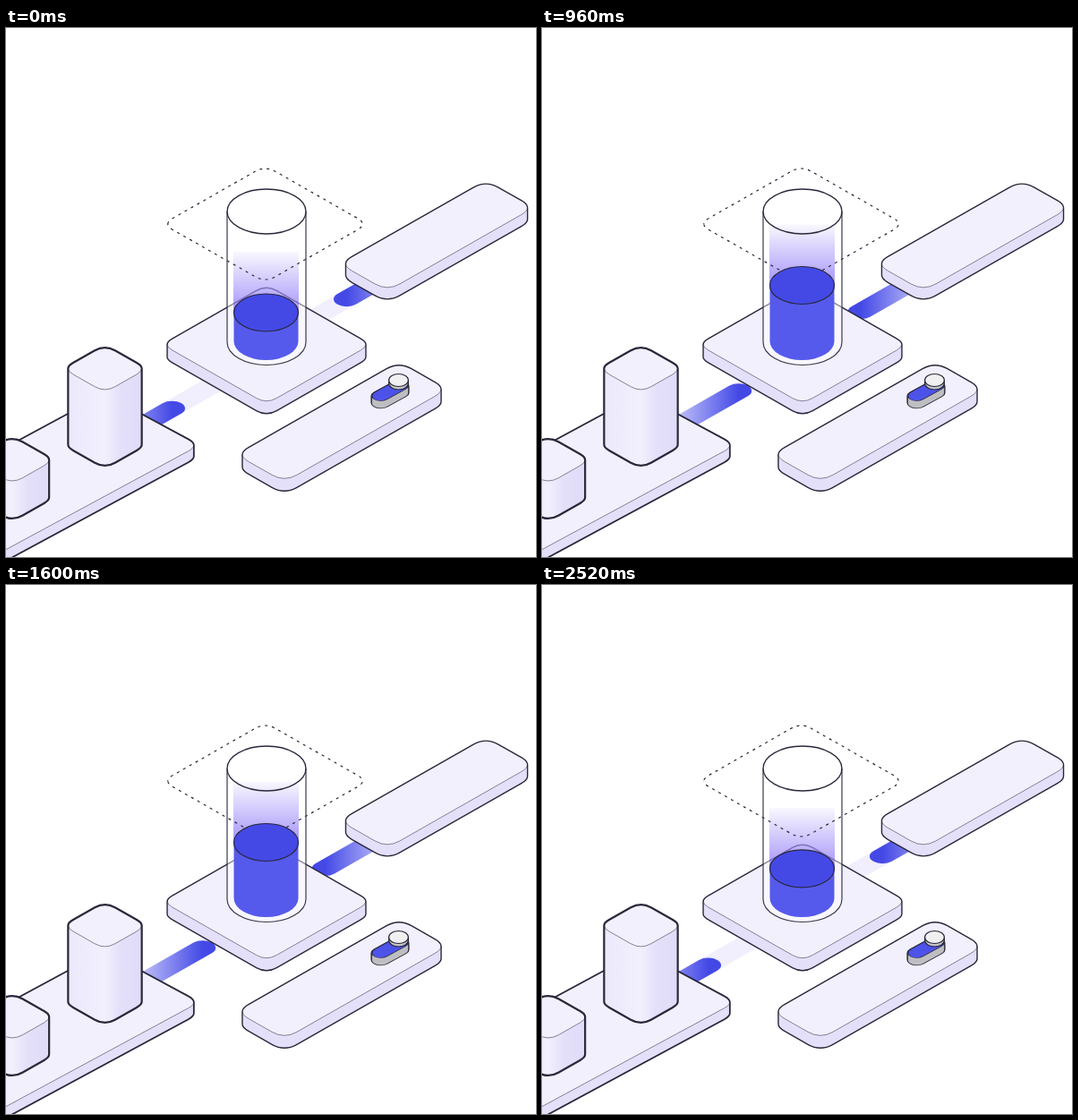
An HTML page with a canvas for the animation above (2.56 s loop, 592x591 px).

```html
<!DOCTYPE html>
<html lang="en">
<head>
<meta charset="utf-8">
<title>Isometric tank</title>
<style>
html, body { margin: 0; width: 100%; height: 100%; overflow: hidden; background: #fff; }
canvas { display: block; }
</style>
</head>
<body>
<canvas id="stage" width="592" height="591"></canvas>
<script>
const ctx = document.getElementById('stage').getContext('2d');
const LOOP = 2560, SLOPE = 0.57;
const INK = '#28283a', FACE = '#f2f0fd', SIDE = '#e4e0fa', BLUE = '#4449e6';

const mix = (p, q, t) => [p[0] + (q[0] - p[0]) * t, p[1] + (q[1] - p[1]) * t];

// Rounded isometric block: a and b are half widths along the two ground axes.
function block(cx, cy, a, b, cut, depth, slope = SLOPE) {
  const at = (s, t) => [cx + s * a + t * b, cy + slope * (t * b - s * a)];
  const L = at(-1, -1), T = at(1, -1), R = at(1, 1), B = at(-1, 1);
  const near = (p, q) => mix(p, q, cut / Math.hypot(q[0] - p[0], q[1] - p[1]));
  const middle = (p, q, r) => mix(mix(q, r, 0.5), p, 0.5);
  const LT = near(L, T), LB = near(L, B), RT = near(R, T), RB = near(R, B);
  const left = middle(L, LT, LB), right = middle(R, RT, RB);
  const line = (path, p, dy = 0) => path.lineTo(p[0], p[1] + dy);
  const curve = (path, c, p, dy = 0) => path.quadraticCurveTo(c[0], c[1] + dy, p[0], p[1] + dy);

  const back = path => {
    path.moveTo(...left);
    curve(path, mix(L, LT, 0.5), LT);
    line(path, near(T, L));
    curve(path, T, near(T, R));
    line(path, RT);
    curve(path, mix(R, RT, 0.5), right);
  };
  const front = (path, dy) => {
    line(path, right, dy);
    curve(path, mix(R, RB, 0.5), RB, dy);
    line(path, near(B, R), dy);
    curve(path, B, near(B, L), dy);
    line(path, LB, dy);
    curve(path, mix(L, LB, 0.5), left, dy);
  };
  const hull = new Path2D(), face = new Path2D(), rim = new Path2D();
  back(hull); front(hull, depth); hull.closePath();
  back(face); front(face, 0); face.closePath();
  rim.moveTo(...right); front(rim, 0);
  return { hull, face, rim, x0: left[0], x1: right[0] };
}

function stroke(path, color, width) {
  ctx.strokeStyle = color;
  ctx.lineWidth = width;
  ctx.stroke(path);
}

function fill(path, color) {
  ctx.fillStyle = color;
  ctx.fill(path);
}

function drawBlock(shape, width, side = SIDE) {
  fill(shape.hull, side);
  fill(shape.face, FACE);
  stroke(shape.rim, '#77758a', 0.9);
  stroke(shape.hull, INK, width);
}

function drawColumn(shape) {
  const shade = ctx.createLinearGradient(shape.x0, 0, shape.x1, 0);
  shade.addColorStop(0, '#ebe8fc');
  shade.addColorStop(0.5, '#f2f0fd');
  shade.addColorStop(0.7, '#e4e0fa');
  shade.addColorStop(1, '#e0dcf8');
  drawBlock(shape, 2.2, shade);
}

function ellipse(x, y, rx, ry) {
  const path = new Path2D();
  path.ellipse(x, y, rx, ry, 0, 0, 7);
  return path;
}

function cylinder(x, top, bottom, rx, ry) {
  const path = new Path2D();
  path.moveTo(x + rx, top);
  path.ellipse(x, bottom, rx, ry, 0, 0, Math.PI);
  path.lineTo(x - rx, top);
  return path;
}

// A round-ended strip lying flat on the ground plane.
function strip(x0, y0, x1, y1, color, width) {
  ctx.save();
  ctx.scale(1, SLOPE);
  ctx.lineCap = 'round';
  const path = new Path2D();
  path.moveTo(x0, y0 / SLOPE);
  path.lineTo(x1, y1 / SLOPE);
  stroke(path, color, width);
  ctx.restore();
}

// A pale track with a blue pill whose colour fades away behind its tip.
function pipe(start, end, tip, y, fade) {
  const yAt = x => y - SLOPE * (x - start);
  const shade = ctx.createLinearGradient(tip, 0, tip - fade, 0);
  shade.addColorStop(0, BLUE);
  shade.addColorStop(1, '#d8d8fb');
  strip(start, y, end, yAt(end), '#f1effd', 29);
  strip(start, y, tip, yAt(tip), shade, 29);
}

const platform = block(291, 353.5, 58.3, 58.3, 13, 14);
const hoverOutline = block(289.5, 219, 57.2, 57.2, 13, 0).face;
const rightBar = block(481, 232, 81.75, 26.75, 16, 13);
const lowerBar = block(375, 440, 91, 27, 16, 14);
const leftSlab = block(13, 518.4, 150, 53, 14, 12.5, 0.54);
const tallColumn = block(110.5, 380.5, 23.4, 23.4, 13, 85);
const shortColumn = block(7, 482.5, 23.4, 23.4, 13, 42);

// Progress through one half of the loop, and the rise of the liquid there.
const RISE = [[0, 0], [0.28, 10], [0.594, 22], [0.75, 30.5], [0.906, 35.5], [1, 37.5]];
function rise(p) {
  const i = Math.max(1, RISE.findIndex(k => k[0] >= p));
  const [p0, v0] = RISE[i - 1], [p1, v1] = RISE[i];
  return v0 + (v1 - v0) * (p - p0) / (p1 - p0);
}

function tank(p) {
  const x = 290.5, level = 318 - rise(p);
  const glass = cylinder(x + 0.5, 205, 351, 44, 25.5);
  fill(glass, 'rgba(255,255,255,.45)');

  const glow = ctx.createLinearGradient(0, level - 68, 0, level);
  glow.addColorStop(0, 'rgba(100,70,245,.04)');
  glow.addColorStop(1, 'rgba(100,70,245,.58)');
  ctx.fillStyle = glow;
  ctx.fillRect(x - 36.5, level - 68, 73, 68);

  ctx.setLineDash([3, 5]);
  ctx.lineDashOffset = -40 * p;
  stroke(hoverOutline, INK, 1.2);
  ctx.setLineDash([]);

  fill(cylinder(x, level, 350, 36, 21), '#565aec');
  const surface = ellipse(x, level, 36, 21);
  fill(surface, BLUE);
  stroke(surface, INK, 1.2);

  stroke(glass, '#3a384c', 1.2);
  stroke(ellipse(x + 0.5, 205, 44, 25), INK, 1.3);
}

function toggle() {
  const pill = (dy, color, width) => strip(418.5, 411 + dy, 439.5, 399.5 + dy, color, width);
  for (let dy = 8; dy >= 0; dy--) pill(dy, INK, 22);
  for (let dy = 8; dy >= 0; dy--) pill(dy, '#bebec2', 19.4);
  pill(0, INK, 20.5);
  pill(0, '#4d53e8', 18.4);
  const base = cylinder(438.5, 393.5, 397, 10.9, 7);
  fill(base, '#c4c4c8');
  stroke(base, INK, 1.2);
  const cap = ellipse(438.5, 393.5, 10.9, 7);
  fill(cap, '#f0f0f1');
  stroke(cap, INK, 1.2);
}

function draw(ms) {
  const p = 1 - Math.abs(1 - (ms % LOOP) / (LOOP / 2));
  const eased = (1 - Math.cos(Math.PI * p)) / 2;
  ctx.fillStyle = '#fff';
  ctx.fillRect(0, 0, 592, 591);

  pipe(145, 250, 185.5 + 40 * eased, 448, 82);
  pipe(425, 330, 380.5 - 28.5 * eased, 277.6, -80);
  drawBlock(leftSlab, 1.8);
  drawColumn(tallColumn);
  drawColumn(shortColumn);
  drawBlock(rightBar, 1.4);
  drawBlock(lowerBar, 1.4);
  drawBlock(platform, 1.4);
  toggle();
  tank(p);
}

let begin;
function tick(now) {
  begin ??= now;
  draw(now - begin);
  requestAnimationFrame(tick);
}
draw(0);
requestAnimationFrame(tick);
</script>
</body>
</html>
```
